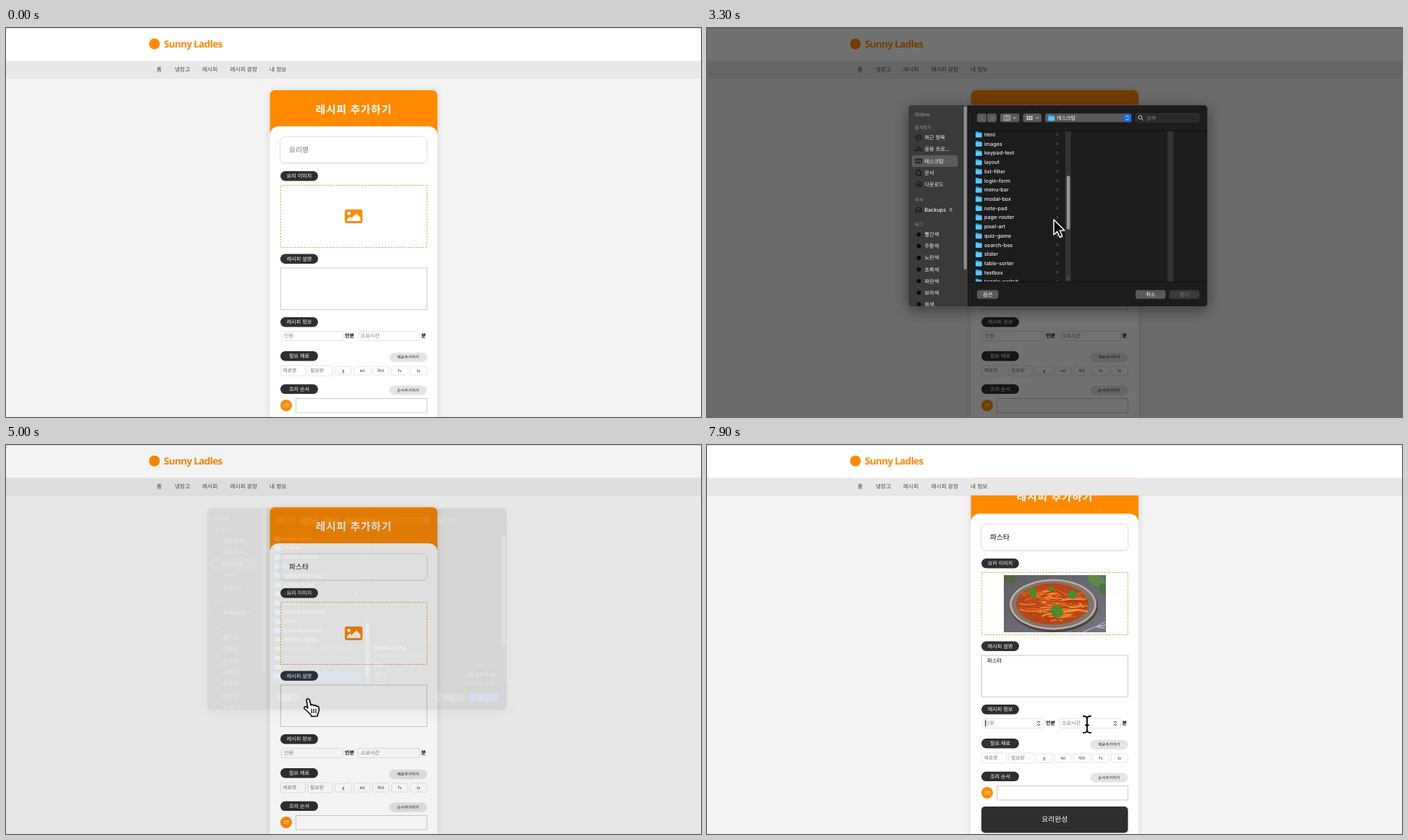
Recreate the animation shown at these times as an HTML page. Size 960 px wide and 538 px high, loop 8000 ms.

```html
<!DOCTYPE html>
<html lang="ko">
<head>
<meta charset="utf-8">
<title>레시피 추가하기</title>
<style>
html, body { margin: 0; width: 100%; height: 100%; overflow: hidden; background: #f3f3f3; }
svg { display: block; width: 100%; height: 100%; }
text { font-family: "Noto Sans CJK KR", "Noto Sans CJK JP", sans-serif; text-rendering: geometricPrecision; white-space: pre; }
#sheet text { font-family: Inter, "Noto Sans CJK KR", "Noto Sans CJK JP", sans-serif; }
</style>
</head>
<body>
<svg id="stage" viewBox="0 0 960 538" xmlns="http://www.w3.org/2000/svg"></svg>
<script>
const ORANGE = '#ff8a00', DARK = '#2f2f2f', HINT = '#757575';
const LOOP = 8000, STEP = 100;

const rect = (x, y, w, h, fill, rx = 0, extra = '') =>
  `<rect x="${x}" y="${y}" width="${w}" height="${h}" rx="${rx}" fill="${fill}" ${extra}/>`;
const line = (d, color, w = 1, extra = '') =>
  `<path d="${d}" fill="none" stroke="${color}" stroke-width="${w}" stroke-linecap="round" stroke-linejoin="round" ${extra}/>`;
// cy is the vertical middle of the glyphs
const text = (x, cy, str, size, fill, weight = 400, anchor = 'start', extra = '') =>
  `<text x="${x}" y="${(cy + size * 0.37).toFixed(2)}" font-size="${size}" fill="${fill}" font-weight="${weight}" text-anchor="${anchor}" ${extra}>${str}</text>`;
const box = (x, y, w, h, stroke = '#dedede', rx = 2) =>
  rect(x, y, w, h, '#fff', rx, `stroke="${stroke}" stroke-width=".8"`);
const caret = (id, x, y, h) => rect(x, y, 0.8, h, '#000', 0, `id="${id}"`);

function randomizer(seed) {
  return () => (seed = (seed * 16807) % 2147483647) / 2147483647;
}

// ---------- page ----------
const pill = (cy, label) =>
  rect(379, cy - 6.7, 52, 13.4, DARK, 6.7) + text(405, cy - 0.3, label, 7.05, '#fff', 500, 'middle');
const chip = (cy, label) =>
  rect(529.5, cy - 6.5, 52, 13, '#e4e4e4', 6.5) + text(555.5, cy, label, 5.5, '#222', 500, 'middle');
const spinner = (id, x) => `<g id="${id}">` + rect(x - 3.3, 421.5, 6.6, 9, '#efefef', 1.5) +
  line(`M${x - 1.5} 424.7l1.5 -1.6l1.5 1.6M${x - 1.5} 427.3l1.5 1.6l1.5 -1.6`, '#444', 1) + '</g>';

function photo() {
  const rnd = randomizer(77);
  const tones = ['#d9601a', '#e8842c', '#b83a14', '#f09a3e', '#c54d18'];
  let noodles = '';
  for (let i = 0; i < 90; i++) {
    const a = rnd() * 6.283, r = Math.sqrt(rnd()) * 0.85;
    const x = 477 + Math.cos(a) * r * 47, y = 261 + Math.sin(a) * r * 27;
    const dx = 6 + rnd() * 10, b = rnd() * 14 - 7;
    noodles += line(`M${x - dx} ${y + b / 2}Q${x} ${y - b} ${x + dx} ${y + b / 3}`, tones[i % 5], 1.7);
  }
  const leaf = (x, y, w, h, turn, fill = '#4c8a2c') =>
    `<ellipse cx="${x}" cy="${y}" rx="${w}" ry="${h}" fill="${fill}" transform="rotate(${turn} ${x} ${y})"/>`;
  return `<g id="photo" clip-path="url(#photoClip)">` + rect(410, 221, 141, 79, 'url(#slate)') +
    leaf(417, 226, 10, 6, 20, '#53643f') + leaf(538, 229, 13, 7, 25, '#5f8a45') + leaf(547, 240, 8, 5, 70, '#4d7540') +
    `<ellipse cx="479" cy="264" rx="61" ry="36" fill="#4a4648"/>
     <ellipse cx="478" cy="261.5" rx="60" ry="35" fill="#bfae9f"/>
     <ellipse cx="478" cy="261.5" rx="57" ry="32.5" fill="#80746e"/>
     <ellipse cx="477" cy="261" rx="50" ry="28.5" fill="#b5481a"/>` + noodles +
    leaf(450, 245, 5, 7, -25) + leaf(505, 248, 7, 5.5, 20) + leaf(483, 271, 9, 8, 40) + leaf(476, 240, 4, 3, 0) +
    line('M519 300L540 291M540 291l9 -5M540 292l10 -2M539 293l10 1', '#b9bcc4', 1.3) + '</g>';
}

function page() {
  const units = ['g', 'ml', '개수', 'Ts', 'ts'].map((u, i) =>
    box(454.5 + 26 * i, 468, 22.7, 12) + text(465.8 + 26 * i, 473.8, u, 5.5, '#222', 500, 'middle')).join('');
  return `<g id="card">` +
    rect(364.5, 86, 231.5, 560, '#fff', 7, 'filter="url(#soft)"') +
    `<path d="M364.5 146V93a7 7 0 0 1 7-7h217.500a7 7 0 0 1 7 7V146z" fill="${ORANGE}"/>` +
    `<path d="M364.500 640V148a12 12 0 0 1 12-12h207.500a12 12 0 0 1 12 12V640z" fill="#fff"/>` +
    text(480.4, 112.5, '레시피 추가하기', 14.7, '#fff', 700, 'middle', 'letter-spacing=".8"') +
    rect(379, 150.5, 202.5, 36, '#fff', 6, 'stroke="#dcdcdc" stroke-width=".8" filter="url(#faint)"') +
    `<g id="dish"></g>` + caret('dishCaret', 391, 162, 13) +
    pill(204.7, '요리 이미지') +
    rect(379.4, 217.5, 202, 86, 'none', 0, 'stroke="#dba047" stroke-width=".9" stroke-dasharray="2.4 1.6"') +
    `<g id="icon">` + rect(468, 251, 24.4, 19, ORANGE, 3) + `<circle cx="473.600" cy="256.400" r="2.400" fill="#fff"/>
      <path d="M471 267v-2.500l4-3.800l2.400 2.300l6.600-6.600l5.600 5.600V267z" fill="#fff"/></g>` +
    photo() +
    pill(319.2, '레시피 설명') + box(379.3, 332, 202, 57.3, '#bdbdbd', 0) +
    `<g id="note"></g>` + caret('noteCaret', 386.6, 334, 10) +
    pill(406.7, '레시피 정보') +
    box(380.5, 419.5, 85, 13) + text(384, 425.7, '인원', 7.1, HINT) + text(468, 425.8, '인분', 7.1, '#000', 700) +
    box(486.5, 419.5, 85, 13) + text(490, 425.7, '소요시간', 7.1, HINT) + text(573.5, 425.8, '분', 7.1, '#000', 700) +
    spinner('spinA', 458) + spinner('spinB', 564) + caret('countCaret', 384, 421, 9.5) +
    pill(453.8, '필요 재료') + chip(455.4, '재료추가하기') +
    box(379.5, 467, 34, 14) + text(382.5, 473.8, '재료명', 6.8, HINT) +
    box(417, 467, 34, 14) + text(420, 473.8, '필요량', 6.8, HINT) + units +
    pill(499.4, '조리 순서') + chip(501, '순서추가하기') +
    `<circle cx="387" cy="522" r="8" fill="${ORANGE}"/>` + text(387, 521.8, '1번', 6.2, '#fff', 400, 'middle') +
    box(400.5, 512.5, 180.8, 19.5, '#bdbdbd', 0) +
    rect(379, 541, 202.5, 36.5, DARK, 5) + text(480.2, 558.8, '요리완성', 9.8, '#fff', 500, 'middle') +
    '</g>';
}

function header() {
  const menu = [[208, '홈'], [233, '냉장고'], [271, '레시피'], [309.5, '레시피 광장'], [364, '내 정보']];
  return rect(0, 0, 960, 45.5, '#fff') + rect(0, 0, 960, 0.8, '#d8d8d8') +
    rect(0, 45.5, 960, 23.8, '#e8e8e8') + rect(0, 69, 960, 0.6, '#dcdcdc') +
    `<circle cx="205" cy="22" r="7.500" fill="${ORANGE}"/>` +
    `<text x="218" y="26.500" style="font-family:'Noto Sans',sans-serif" font-size="13.500" font-weight="600" letter-spacing="-.65" fill="${ORANGE}">Sunny Ladles</text>` +
    menu.map(([x, s]) => text(x, 56.8, s, 7.7, '#444')).join('');
}

// ---------- file sheet ----------
const ROW = 12.72, TOP = 152, SCROLL = 347.2;
const folders = ('4-19-19px api average-helpers calendar-widgets card-table carousel-demo clone-coding ' +
  'cursor-effects cursor-effects-exercises DataRows draft-one folding-cards fruit-counter html images keypad-test ' +
  'layout list-filter login-form menu-bar modal-box note-pad page-router pixel-art quiz-game search-box slider ' +
  'table-sorter textbox toggle-switch typing-js upload-list-app upload-test1 windowDemo wizard wizard-exercises ' +
  'zone zone-exercises').split(' ');
const files = ['계란말이.webp', '화면 기록 202…4.39.36.mov', '화면 기록 202…4.42.04.mov', '화면 기록 2023…4.43.12.mov', 'pasta.jpeg'];
const folderIcon = (x, y) =>
  `<path d="M${x} ${y - 3}q0-1 1-1h2.400l1 1h3.200q1 0 1 1v5q0 1-1 1h-6.600q-1 0-1-1z" fill="#2aa6e8"/>` + rect(x, y - 1.6, 8.6, 5.6, '#5cc8fa', 0.9);

function fileRows() {
  const dirs = folders.map((name, i) => {
    const y = TOP + ROW * i;
    return folderIcon(371, y) + text(383, y, name, 7.2, '#f0f0f0', 500) +
      line(`M483.300 ${y - 1.6}l1.500 1.600l-1.500 1.600`, '#999', 0.8);
  });
  const docs = files.map((name, i) => {
    const y = TOP + ROW * (folders.length + i), last = i === 4, movie = i > 0 && !last;
    return (last ? rect(367, y - 6.1, 122, 12.2, '#0058d0', 2.5, 'id="picked"') : '') +
      rect(371, y - 2.8, 8.6, 5.6, movie ? '#d4d4d4' : '#d8b878', 0.5) +
      rect(373.5, y - 1.2, 3.5, 2.4, movie ? '#777' : '#a5542a', 0.5) +
      text(383, y, name, 7.2, movie ? '#6c6c6c' : '#f0f0f0', 500);
  });
  return dirs.concat(docs).join('');
}

function sidebar() {
  const head = (cy, s, size = 6.2) => text(287, cy, s, size, '#9a9a9a', 500);
  const item = (cy, s, d) => line(d, 'currentColor', 0.9, `transform="translate(292.500 ${cy})"`) +
    text(300.5, cy, s, 7.2, '#f2f2f2', 500);
  const ring = 'M-3.700 0a3.700 3.700 0 1 0 7.400 0a3.700 3.700 0 1 0 -7.400 0';
  const drive = 'M-4 1l1.500-3.500h5l1.500 3.500v2.500h-8zM-4 1h8';
  const colors = ['#ff5257', '#ff9f0a', '#ffe014', '#1fe02c', '#0a84ff', '#bf5af2', '#98989d'];
  const tags = ['빨간색', '주황색', '노란색', '초록색', '파란색', '보라색', '회색'].map((s, i) =>
    `<circle class="dot" data-c="${colors[i]}" cx="292.500" cy="${285.6 + 16.1 * i}" r="2.900"/>` +
    text(300.5, 285.6 + 16.1 * i, s, 7.2, '#f2f2f2', 500)).join('');
  return `<g id="side" clip-path="url(#sheetClip)">` + rect(278, 106.5, 82.5, 279, 'inherit') +
    head(119.5, 'Online', 6.8) + head(138, '즐겨찾기') +
    rect(283, 176, 63.5, 16, '#5b5b5d', 3) +
    item(151.5, '최근 항목', ring + 'M0 -2.200V0.200H-1.800') +
    item(167.7, '응용 프로…', 'M-3.800 3L0 -3.800L3.800 3M-4 1h8') +
    item(184, '데스크탑', 'M-4 -3h8v6h-8zM-4 -1.300h8M-2 1.500h4') +
    item(200, '문서', 'M-2.800 -3.800h3.600l2 2v5.600h-5.600zM0.800 -3.800v2h2') +
    item(216.2, '다운로드', ring + 'M0 -2v3.600M-1.500 0.300l1.500 1.500l1.500 -1.500') +
    head(237.3, '위치') + item(251, 'Backups', drive) +
    `<path d="M334.500 251.200l2.300-3l2.300 3zM334.500 252.300h4.600v1h-4.600z" fill="#999"/>` +
    `<g id="media" color="#b8b8b8">` + head(271.6, '미디어') + item(285.6, '사진', 'M-4 -2.200h2l1-1.200h2l1 1.200h2v5.400h-8zM-1.500 0.400a1.500 1.500 0 1 0 3 0a1.500 1.500 0 1 0 -3 0') + '</g>' +
    `<g id="tags">` + head(272, '태그') + tags + '</g>' +
    rect(354.6, 108, 4.4, 226, '#8b8b8d', 2.2) + '</g>';
}

function sheet() {
  const button = (x, w, y = 118.3, h = 12, fill = '#5a5a5c', extra = '') => rect(x, y, w, h, fill, 2.8, extra);
  const down = x => line(`M${x - 1.7} 123.600l1.700 1.700l1.700 -1.700`, '#ddd', 1);
  const cells = [0, 1, 2].map(i => [0, 1].map(j => rect(441.5 + 3 * i, 121.4 + 3.4 * j, 2.2, 2.5, '#ddd', 0.4)).join('')).join('');
  return `<g id="sheet">` +
    rect(278, 106.5, 413.5, 279, '#1e1e1e', 5, 'id="pane" filter="url(#deep)"') + sidebar() +
    rect(360.3, 106.5, 0.8, 279, '#111') + rect(361, 142, 330, 0.8, '#0c0c0c') + rect(361, 350.6, 330, 0.8, '#0c0c0c') +
    button(373, 13) + button(387, 13) + line('M380.500 121.800l-2 2.500l2 2.500M392.500 121.800l2 2.500l-2 2.500', '#8a8a8a', 0.9) +
    button(405, 26.5) + line('M410.500 121h8v6.600h-8zM413.200 121v6.600M415.800 121v6.600', '#ddd', 0.8) + down(425) +
    button(436.5, 25.5) + cells + down(456) +
    button(467, 119.5) + folderIcon(471.5, 124.3) + text(483.2, 124, '데스크탑', 7, '#fff', 500) +
    rect(575.3, 119, 10.4, 10.6, '#0a6cf0', 2.8) + line('M578.800 123l1.700-1.800l1.700 1.800M578.800 125.600l1.700 1.800l1.700-1.800', '#fff', 1) +
    rect(592, 118.5, 88, 11.6, '#2a2a2b', 2.8, 'stroke="#444" stroke-width=".6"') +
    line('M596 123.600a2.500 2.500 0 1 0 5 0a2.500 2.500 0 1 0 -5 0M600.400 125.500l2 2', '#ddd', 0.9) +
    text(607, 124, '검색', 7, '#8d8d8d') +
    `<g clip-path="url(#listClip)"><g id="rows">` + fileRows() + '</g></g>' +
    rect(494.8, 142.8, 8, 207.8, '#333') + rect(496.8, 144.5, 4.6, 74.5, '#949496', 2.3, 'id="thumb"') +
    line('M498 344.500v4M500 344.500v4', '#777', 0.6) +
    rect(636, 142.8, 8.5, 207.8, '#333', 0, 'id="column"') +
    `<g id="preview" clip-path="url(#previewClip)">` +
    text(509, 298.6, 'pasta.jpeg', 8.5, '#f2f2f2', 600) + text(509, 310.2, 'JPEG 이미지 – 1.3MB', 7.2, '#a5a5a5') +
    text(509, 324, '정보', 6.8, '#fff', 700) + text(677, 324, '자세히 보기', 6.2, '#2f86ff', 400, 'end') +
    text(509, 337, '생성일', 6.2, '#ccc') + text(677, 337, '오늘 오후 4:46', 6.6, '#fff', 500, 'end') +
    text(509, 350, '수정일', 6.2, '#ccc') + text(677, 350, '오늘 오후 4:46', 6.6, '#fff', 500, 'end') +
    rect(683.5, 142.8, 8, 207.8, '#333') + rect(685.2, 145, 4.6, 154, '#949496', 2.3) + '</g>' +
    button(373, 29.5, 362.4, 12) + text(387.7, 368.3, '옵션', 7, '#fff', 500, 'middle') +
    button(592, 41.5, 362.4, 12) + text(612.7, 368.3, '취소', 7, '#fff', 500, 'middle') +
    button(638.5, 41.5, 362.4, 12, '#3a3a3c', 'id="open"') + text(659.2, 368.3, '열기', 7, '#777', 500, 'middle', 'id="openText"') +
    rect(278, 106.5, 413.5, 279, 'none', 5, 'stroke="#5e5e60" stroke-width=".8"') + '</g>';
}

// ---------- pointers ----------
const beam = 'M-5-11.500C-2-11.500 0-10.500 0-8V8C0 10.500-2 11.500-5 11.500M5-11.500C2-11.500 0-10.500 0-8M0 8C0 10.500 2 11.500 5 11.500M-2.200 1h4.400';
const pointers = `<g id="pointer">
  <path id="arrow" d="M0 0V21L4.800 16.600L8.300 24.500L11.800 23L8.400 15.300L15 15Z" fill="#000" stroke="#fff" stroke-width="1.500" stroke-linejoin="round"/>
  <g id="hand" filter="url(#faint)"><path d="M-2 2.200C-2-.8 1.800-.8 2.500 2L4 9C5 7.400 7 7.800 7.600 9.500C9 8 11 8.600 11.400 10.400C13 9.400 15.200 10.400 15.200 12.500C15.700 16 15.500 18 13.500 21L13.300 24L5 24.300L4 22C1 19-2 16-4.800 13.500C-6.300 11.500-3.500 9.800-1.500 11.600L0 13Z" fill="#fff" stroke="#000" stroke-width="1.500" stroke-linejoin="round"/>` +
  line('M5 14l.4 5.500M8 14l.2 5.500M11 14v5.500', '#000', 1.2) + `</g>
  <g id="beam">` + line(beam, '#fff', 3) + line(beam, '#000', 1.8) + '</g></g>';

// time, x, y, shape
const path = [
  [1600, 494, 180, 'beam'], [1700, 491, 200, 'arrow'], [1800, 490, 225, 'hand'], [2000, 485.5, 270, 'hand'],
  [2600, 485.5, 270, 'hand'], [2700, 482, 267, 'arrow'], [2800, 479, 265, 'arrow'], [3400, 479, 265, 'arrow'],
  [4000, 409, 339.5, 'arrow'], [4100, 411, 346, 'arrow'], [4400, 411, 346, 'arrow'], [4500, 417, 351, 'hand'],
  [5300, 417, 351, 'hand'], [5400, 417, 358, 'beam'], [5500, 416, 360, 'beam'], [6500, 416, 360, 'beam'],
  [7400, 421, 385, 'beam'], [7600, 421, 385, 'beam'], [7700, 445, 392, 'beam'], [7800, 490, 395, 'beam'],
  [7900, 525, 386.5, 'beam'], [8000, 525, 386.5, 'beam']];

const clip = (id, x, y, w, h, rx = 0) => `<clipPath id="${id}">${rect(x, y, w, h, '#000', rx)}</clipPath>`;
const shadow = (id, dy, blur, alpha) =>
  `<filter id="${id}" x="-30%" y="-30%" width="160%" height="170%"><feDropShadow dx="0" dy="${dy}" stdDeviation="${blur}" flood-color="#000" flood-opacity="${alpha}"/></filter>`;

document.getElementById('stage').innerHTML = '<defs>' +
  clip('photoClip', 410, 221, 141, 79) + clip('sheetClip', 278, 106.5, 413.5, 279, 5) +
  clip('listClip', 361, 142.8, 134, 207.8) + clip('previewClip', 503, 142.8, 188.5, 207.8) +
  shadow('soft', 1, 4, 0.13) + shadow('faint', 0.6, 0.8, 0.13) + shadow('deep', 5, 10, 0.45) +
  `<linearGradient id="slate" x2="1" y2="1"><stop stop-color="#5d5e66"/><stop offset="1" stop-color="#74757d"/></linearGradient></defs>` +
  rect(0, 0, 960, 538, '#f3f3f3') + page() + header() +
  rect(0, 0, 960, 538, '#000', 0, 'id="dim"') + sheet() + pointers;

const el = {};
document.querySelectorAll('#stage [id]').forEach(n => el[n.id] = n);
const dots = document.querySelectorAll('.dot');
const clamp = v => Math.max(0, Math.min(1, v));
const show = (node, on) => node.style.display = on ? '' : 'none';
const set = (node, name, value) => node.setAttribute(name, value);
const shift = (node, x, y) => set(node, 'transform', `translate(${x} ${y})`);
const within = (t, a, b) => t >= a && t < b;

function movePointer(t) {
  show(el.pointer, t >= path[0][0]);
  if (t < path[0][0]) return;
  let i = 0;
  while (i < path.length - 2 && t >= path[i + 1][0]) i++;
  const [t0, x0, y0, shape] = path[i], [t1, x1, y1] = path[i + 1];
  const p = clamp((t - t0) / (t1 - t0));
  shift(el.pointer, x0 + (x1 - x0) * p, y0 + (y1 - y0) * p);
  for (const name of ['arrow', 'hand', 'beam']) show(el[name], name === shape);
}

function drawPage(t) {
  const dish = t < 1000 ? '' : t < 1100 ? '파스' : '파스타';
  el.dish.innerHTML = text(391, 168, dish || '요리명', 9.8, dish ? '#000' : HINT);
  show(el.dishCaret, within(t, 500, 1500));
  set(el.dishCaret, 'x', 391 + dish.length * 9);

  const note = t < 6000 ? '' : t < 6100 ? '파ㅅ' : '파스타';
  el.note.innerHTML = text(387, 339.2, note, 7.4, '#000');
  show(el.noteCaret, within(t, 5500, 6600) || within(t, 7100, 7500));
  set(el.noteCaret, 'x', 386.6 + note.length * 6.85);

  show(el.icon, t < 5300);
  show(el.photo, t >= 5300);
  show(el.spinA, t >= 7500);
  show(el.countCaret, t >= 7500);
  show(el.spinB, t >= 7800);
  const p = clamp((t - 6500) / 900);
  shift(el.card, 0, -41 * p * p * (3 - 2 * p));
}

function drawSheet(t) {
  const enter = t < 2600 ? 0 : clamp((t - 2500) / 500);
  const leave = t < 4700 ? 0 : clamp(1 - Math.pow(1 - (t - 4600) / 500, 1.52));
  const on = enter > 0 && t < 5100;
  show(el.sheet, on);
  show(el.dim, on);
  if (!on) return;
  set(el.dim, 'opacity', 0.555 * enter * (1 - leave));
  set(el.sheet, 'opacity', Math.min(1, enter * 1.67) * (1 - leave));
  shift(el.sheet, 0, -19 * (1 - enter) - 21 * leave);

  const tinted = t < 3000, early = t < 3200;
  set(el.pane, 'fill', tinted ? '#211c2a' : '#1e1e1e');
  set(el.side, 'fill', tinted ? '#423e47' : '#3a3a3a');
  set(el.side, 'color', early ? '#1e90ff' : '#0b0b0b');
  show(el.media, early);
  shift(el.tags, 0, early ? 34.5 : 0);
  dots.forEach(d => set(d, 'fill', early ? d.dataset.c : '#0b0b0b'));

  const p = 1 - Math.pow(1 - clamp((t - 3100) / 700), 2);
  shift(el.rows, 0, -SCROLL * p);
  shift(el.thumb, 0, 122 * p);

  const picked = t >= 4400;
  show(el.picked, picked);
  show(el.preview, picked);
  show(el.column, !picked);
  set(el.open, 'fill', picked ? '#1a6fee' : '#3a3a3c');
  set(el.openText, 'fill', picked ? '#fff' : '#777');
}

const start = performance.now();
let last = -1;
function frame(now) {
  const t = Math.floor(Math.max(0, now - start) % LOOP / STEP) * STEP;
  if (t !== last) {
    last = t;
    drawPage(t);
    drawSheet(t);
    movePointer(t);
  }
  requestAnimationFrame(frame);
}
frame(start);
</script>
</body>
</html>
```
